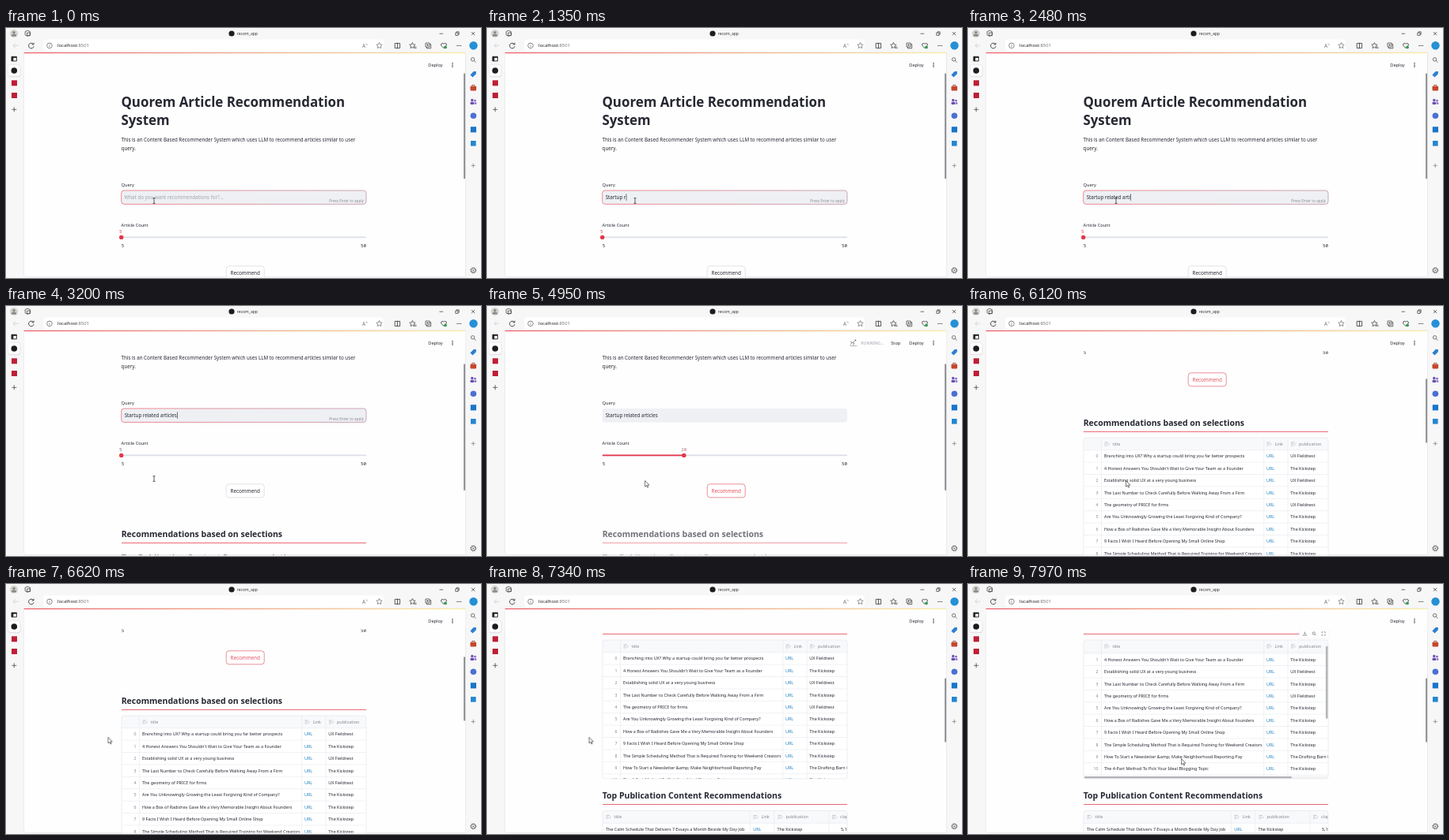
Animation, 600 px wide and 317 px high, one loop 8000 ms. Source, as an HTML page:

```html
<!DOCTYPE html>
<html lang="en">
<head>
<meta charset="utf-8">
<title>recom_app</title>
<style>
html, body { margin: 0; width: 100%; height: 100%; overflow: hidden; background: #f7f7f8; }
svg { display: block; width: 100vw; height: 100vh; font-family: "Noto Sans", "Open Sans", sans-serif; }
text { white-space: pre; }
.mono { font-family: "Noto Sans Mono", "DejaVu Sans Mono", monospace; }
</style>
</head>
<body>
<svg id="stage" viewBox="0 0 600 317">
  <defs>
    <linearGradient id="glow"><stop stop-color="#f0525e"/><stop offset="1" stop-color="#fbf0a0"/></linearGradient>
    <linearGradient id="focus"><stop stop-color="#ec5a66"/><stop offset="1" stop-color="#b98592"/></linearGradient>
    <clipPath id="panelClip"><path d="M22.5 31H580.5V315.5H25.5a3 3 0 0 1-3-3z"/></clipPath>
    <clipPath id="tableClip"><rect x="146" y="384" width="309" height="176" rx="3"/></clipPath>
    <clipPath id="rowsClip"><rect x="146" y="400" width="309" height="160"/></clipPath>
    <clipPath id="table2Clip"><rect x="146" y="600.5" width="309" height="176" rx="3"/></clipPath>
  </defs>
</svg>
<script>
const LOOP = 8000;
const INK = "#262832", RED = "#e5364a", GREY = "#85878f", LINE = "#e6e7ec", LINK = "#1f7fbe";
const stage = document.getElementById("stage");

function add(parent, tag, attrs = {}) {
  const el = document.createElementNS("http://www.w3.org/2000/svg", tag);
  for (const k in attrs) el.setAttribute(k, attrs[k]);
  parent.appendChild(el);
  return el;
}
const group = (p, attrs) => add(p, "g", attrs);
const rect = (p, x, y, width, height, fill, more = {}) => add(p, "rect", { x, y, width, height, fill, ...more });
const dot = (p, cx, cy, r, fill, more = {}) => add(p, "circle", { cx, cy, r, fill, ...more });
const stroke = (p, d, color = "#444", w = 0.8, more = {}) =>
  add(p, "path", { d, fill: "none", stroke: color, "stroke-width": w, ...more });

// cy is the vertical middle of the capitals
function label(p, x, cy, str, size, fill = INK, more = {}) {
  const el = add(p, "text", { x, y: cy + size * 0.37, "font-size": size, fill, ...more });
  el.textContent = str;
  return el;
}
const show = (el, on) => el.setAttribute("visibility", on ? "inherit" : "hidden");
const shift = (el, x, y) => el.setAttribute("transform", `translate(${x} ${y})`);

// ---- browser window ----
function drawWindow() {
  const g = group(stage);
  rect(g, 0, 0, 600, 317, "#f7f7f8");
  dot(g, 10, 7, 5, "#d5d3d0");
  dot(g, 10, 5.6, 1.7, "#8b8781");
  add(g, "path", { d: "M6.8 10.4a3.2 2.8 0 0 1 6.4 0z", fill: "#8b8781" });
  stroke(g, "M24.2 4.6l3-1.4 3.2 1.4v4.2l-3.2 1.6-3-1.6zM26.6 6h4v3.6h-4z", "#444", 0.8);
  dot(g, 285, 7, 3.6, "#1d1d1f");
  label(g, 291.8, 7, "recom_app", 5, "#333");
  stroke(g, "M547.5 7.2h4.6M567.8 6h3.2v3.4h-3.2zM569 6V4.8h3.2v3.4H571M588 5l4.2 4.2M592.2 5l-4.2 4.2", "#333", 0.7);

  rect(g, 47, 14.5, 430, 15, "#fff", { rx: 4 });
  stroke(g, "M15.5 22.3h-6.5M12 19.4l-3 2.9 3 2.9", "#cfcfd2");
  stroke(g, "M34.6 20.6a3.3 3.3 0 1 0 .5 2.6M35 18.7v2.2h-2.3", "#333", 0.9);
  dot(g, 55, 22.3, 3.3, "none", { stroke: "#555", "stroke-width": 0.7 });
  stroke(g, "M55 21.9v2M55 20.4v.7", "#555", 0.7);
  const url = label(g, 65, 22.3, "localhost", 5.9, "#222");
  add(url, "tspan", { fill: "#777" }).textContent = ":8501";
  label(g, 450, 22.5, "A", 6.3, "#777");
  stroke(g, "M455 19.4q1.3 1 1 2.6", "#777", 0.6);
  const star = "l1.1 2.4 2.6.3-1.9 1.8.5 2.6-2.3-1.3-2.3 1.3.5-2.6-1.9-1.8 2.6-.3z";
  stroke(g, "M471.5 18.5" + star, "#666", 0.7);
  stroke(g, "M491.2 19.4h6.4v6h-6.4zM494.4 18.8v7.2", "#333");
  stroke(g, "M513.4 18.5" + star + "M516 24h2.4M516.6 25.6h1.8", "#333", 0.7);
  stroke(g, "M530 19h5v5h-5zM531.5 24v1.8h5.2v-5.2h-1.7M532.5 20.3v2.4M531.3 21.5h2.4", "#333", 0.7);
  stroke(g, "M553 25.5l-3.3-3.2q-.6-3 1.7-3 1.1 0 1.6 1 .5-1 1.6-1 2.3 0 1.7 3z", "#333", 0.8);
  dot(g, 555, 24.4, 1.9, "#3a9b52");
  for (const x of [570, 572.2, 574.4]) dot(g, x, 22.4, 0.65, "#333");
  dot(g, 590.5, 22.3, 5.2, "#2590d6");

  // tab strip
  stroke(g, "M7 36.3h6.4v5.6h-6.4z", "#222", 0.9);
  rect(g, 7, 36.3, 6.4, 1.6, "#222");
  rect(g, 7, 36.3, 2.3, 5.6, "#222");
  rect(g, 2.7, 47.2, 15.6, 15, "#e2e2e5", { rx: 3 });
  rect(g, 2.5, 46.3, 15.5, 15, "#fff", { rx: 3, stroke: "#d8d8db", "stroke-width": 0.5 });
  dot(g, 10.3, 54, 3.8, "#1d1d1f");
  rect(g, 7, 66.3, 7, 7, "#bf1f36");
  rect(g, 7, 82, 7, 7, "#bf1f36");
  stroke(g, "M10.3 100.3v6M7.3 103.3h6", "#333", 0.7);

  // side bar
  dot(g, 589.6, 39.8, 2.2, "none", { stroke: "#555", "stroke-width": 0.8 });
  stroke(g, "M591.2 41.4l2.3 2.3", "#555");
  add(g, "path", { d: "M586.4 59.4l4.2-4.4h3.2v3.2l-4.3 4.3z", fill: "#2c7fd0" });
  rect(g, 586.5, 73.8, 7.6, 5.6, "#c4472c", { rx: 0.8 });
  stroke(g, "M588.7 73.8v-1.4h3.2v1.4", "#8f3522");
  dot(g, 588.8, 91.5, 1.7, "#6a4fb0");
  dot(g, 592.5, 92.2, 1.4, "#8c6bc8");
  rect(g, 586.5, 93.7, 4.8, 3.2, "#6a4fb0", { rx: 1.2 });
  rect(g, 591.6, 94.2, 2.8, 2.6, "#8c6bc8", { rx: 1 });
  dot(g, 590.4, 111.2, 3.8, "#4b6fd3");
  rect(g, 586.8, 125.2, 7.2, 7.2, "#1976c9");
  rect(g, 587, 143, 6.6, 6.6, "#2586cf");
  stroke(g, "M590.2 171.8v5.2M587.6 174.4h5.2", "#666", 0.6);
  dot(g, 590.3, 307.3, 2.8, "none", { stroke: "#555", "stroke-width": 0.9 });
  dot(g, 590.3, 307.3, 3.6, "none", { stroke: "#555", "stroke-width": 0.8, "stroke-dasharray": "1.4 1.43" });
  dot(g, 590.3, 307.3, 0.9, "#555");

  add(g, "path", { d: "M22.5 31H580.5V315.5H25.5a3 3 0 0 1-3-3z", fill: "#fefefe", stroke: "#e3e3e6", "stroke-width": 0.6 });
}

// ---- page content ----
const START = "The Kickstep", UX = "UX Fieldnest";
const rows = [
  ["Branching into UX? Why a startup could bring you far better prospects", UX],
  ["4 Honest Answers You Shouldn't Wait to Give Your Team as a Founder", START],
  ["Establishing solid UX at a very young business", UX],
  ["The Last Number to Check Carefully Before Walking Away From a Firm", START],
  ["The geometry of PRICE for firms", UX],
  ["Are You Unknowingly Growing the Least Forgiving Kind of Company?", START],
  ["How a Box of Radishes Gave Me a Very Memorable Insight About Founders", START],
  ["9 Facts I Wish I Heard Before Opening My Small Online Shop", START],
  ["The Simple Scheduling Method That is Required Training for Weekend Creators", START],
  ["How To Start a Newsletter &amp; Make Neighborhood Reporting Pay", "The Drafting Barn Collected"],
  ["The 4-Part Method To Pick Your Ideal Blogging Topic", START]
];
const ROW = 15.4, HEAD = 15.7;

function columnHead(p, x, cy, name) {
  stroke(p, `M${x} ${cy - 2}h4.4M${x} ${cy}h3M${x} ${cy + 2}h2M${x + 3.2} ${cy + 2.2}l3-3`, "#a0a2aa", 0.6);
  label(p, x + 10, cy, name, 5.4, GREY);
}
function tableFrame(p, top, height) {
  rect(p, 146, top, 309, height, "none", { rx: 3, stroke: LINE, "stroke-width": 0.7 });
}
function tableHead(p, top, edges, names) {
  rect(p, 146, top, 309, HEAD, "#f8f9fb");
  names.forEach(([x, name]) => columnHead(p, x, top + 8, name));
  stroke(p, `M146 ${top + HEAD}h309` + edges.map(x => `M${x} ${top}v176`).join(""), LINE, 0.6);
}
function heading(p, cy, str) {
  label(p, 145.7, cy, str, 10.5, INK, { "font-weight": 600 });
  rect(p, 146, cy + 10.9, 309, 0.9, "#e65563");
}

drawWindow();
const view = group(stage, { "clip-path": "url(#panelClip)" });
const page = group(view);

["Quorem Article Recommendation", "System"].forEach((s, i) =>
  label(page, 145.4, 93.8 + i * 23.4, s, 16.9, INK, { "font-weight": 700 }));
label(page, 145.6, 141.5, "This is an Content Based Recommender System which uses LLM to recommend articles similar to user", 6.2);
label(page, 145.6, 152.7, "query.", 6.2);

label(page, 145.6, 198.5, "Query", 5.6);
const box = rect(page, 145.7, 206, 309.3, 17.4, "#eef0f4", { rx: 3.5, "stroke-width": 0.7 });
const hint = label(page, 149.5, 214.6, "What do you want recommendations for?...", 6.2, "#a3a5ad");
const query = label(page, 149.7, 214.6, "", 6.2);
const caret = rect(page, 0, 210.3, 0.6, 8.6, "#222");
const enter = label(page, 452, 219, "Press Enter to apply", 4.7, "#8b8d95", { "text-anchor": "end" });

label(page, 145.6, 249.7, "Article Count", 5.6);
rect(page, 145.7, 264.4, 309.3, 1.9, "#dcdfe6", { rx: 0.9 });
const fill = rect(page, 145.7, 264.4, 0, 1.9, RED, { rx: 0.9 });
const thumb = dot(page, 0, 265.4, 2.7, RED);
const count = label(page, 0, 258.2, "5", 5.9, RED, { class: "mono", "text-anchor": "middle" });
label(page, 145.7, 275.6, "5", 5.9, INK, { class: "mono" });
label(page, 455, 275.6, "50", 5.9, INK, { class: "mono", "text-anchor": "end" });

const button = rect(page, 278.2, 301.8, 48, 17, "#fff", { rx: 3.5, "stroke-width": 0.7 });
const buttonText = label(page, 302.2, 310.2, "Recommend", 6.3, INK, { "text-anchor": "middle" });

const headings = group(page);
heading(headings, 365, "Recommendations based on selections");
const heading2 = group(headings);
heading(heading2, 581.1, "Top Publication Content Recommendations");

const results = group(page);
const table = group(results, { "clip-path": "url(#tableClip)" });
rect(table, 146, 384, 309, 176, "#fff");
const rowsBox = group(table, { "clip-path": "url(#rowsClip)" });
const rowList = group(rowsBox);
rows.forEach(([title, publication], i) => {
  const cy = 384 + HEAD + ROW * (i + 0.5);
  label(rowList, 164.5, cy, i, 5.2, GREY, { "text-anchor": "end" });
  label(rowList, 172, cy, title, 5.4);
  label(rowList, 377, cy, "URL", 5.4, LINK);
  label(rowList, 407.3, cy, publication, 5.4);
  stroke(rowList, `M146 ${cy + ROW / 2}h309`, LINE, 0.6);
});
tableHead(table, 384, [168.5, 373.7, 404], [[172.5, "title"], [377.5, "Link"], [408, "publication"]]);
const bars = group(table);
rect(bars, 146, 556.3, 309, 3.7, "#f4f4f6");
rect(bars, 147, 556.9, 262, 2.6, "#b4b5b9", { rx: 1.3 });
const vBar = rect(bars, 451.9, 384.3, 2.8, 92, "#b4b5b9", { rx: 1.3 });
tableFrame(results, 384, 176);

const tools = group(results);
rect(tools, 418.5, 370, 37.5, 12, "#fff", { rx: 2.5, stroke: "#eeeef1", "stroke-width": 0.5 });
stroke(tools, "M425.5 373.6v3M424.2 375.5l1.3 1.3 1.3-1.3M423.3 377v1.2h4.4V377", "#666", 0.6);
dot(tools, 436.8, 375.5, 1.6, "none", { stroke: "#666", "stroke-width": 0.7 });
stroke(tools, "M438 376.7l1.7 1.7", "#666", 0.7);
stroke(tools, "M447 375v-1.2h1.3M449.9 373.8h1.3V375M451.2 376.8v1.2h-1.3M448.3 378H447v-1.2", "#666", 0.7);

const table2 = group(results, { "clip-path": "url(#table2Clip)" });
label(table2, 150, 624, "The Calm Schedule That Delivers 7 Essays a Month Beside My Day Job", 5.4);
label(table2, 336.3, 624, "URL", 5.4, LINK);
label(table2, 366.5, 624, START, 5.4);
label(table2, 447, 624, "5,100", 5.4);
tableHead(table2, 600.5, [332.3, 362.7, 432], [[150.5, "title"], [336.5, "Link"], [367.5, "publication"], [436, "claps"]]);
tableFrame(results, 600.5, 176);

// ---- fixed page header ----
const scrollBar = rect(view, 578.1, 31, 2.2, 0, "#909195");
rect(view, 22.5, 31, 558, 26.6, "#fefefe");
rect(view, 22.5, 30.6, 558, 1.5, "url(#glow)");
label(view, 533.3, 46.9, "Deploy", 5.6);
for (const y of [44.7, 46.9, 49.1]) dot(view, 564, y, 0.75, INK);
const running = group(view);
dot(running, 465.3, 43.5, 1, "#777");
const runner = stroke(running, "", "#777", 0.8);
stroke(running, "M458.5 50.6h9", "#999", 0.7);
label(running, 472.3, 46.9, "RUNNING...", 5.3, "#a3a5ad");
label(running, 510.3, 46.9, "Stop", 5.6);

// ---- pointer ----
const arrow = add(stage, "path", {
  d: "M0 0v7.6l1.8-1.6 1.2 2.7 1.1-.5-1.2-2.6h2.4z", fill: "#fff", stroke: "#222", "stroke-width": 0.6
});
const beam = stroke(stage, "M-1.5 -3.3h3M0 -3.3v6.6M-1.5 3.3h3", "#333", 0.8);

// ---- motion ----
function at(t, keys, ease = u => u * u * (3 - 2 * u)) {
  if (t <= keys[0][0]) return keys[0][1];
  for (let i = 1; i < keys.length; i++) {
    const [t0, a] = keys[i - 1], [t1, b] = keys[i];
    if (t < t1) return a + (b - a) * ease((t - t0) / (t1 - t0));
  }
  return keys[keys.length - 1][1];
}
const linear = u => u;

const PHRASE = "Startup related articles";
const TYPED = [[140, 1], [900, 7], [990, 8], [1300, 9], [1710, 14], [1870, 15], [2030, 16], [2760, 24]];
const SCROLL = [[2840, 0], [3190, 76], [5310, 76], [5660, 132], [5700, 132], [6080, 217],
  [6625, 217], [6800, 265], [6980, 265], [7160, 313]];
const MOUSE_X = [[3380, 187], [3600, 146], [3660, 146], [4140, 248.9], [4190, 248.9], [4320, 300],
  [4500, 300], [4900, 199.6], [6120, 199.6], [6440, 129], [7340, 129], [7740, 269.6]];
const MOUSE_Y = [[3380, 219], [3600, 189], [4190, 189], [4320, 233], [4500, 233], [4900, 221.5],
  [6120, 221.5], [6440, 194.3], [7340, 194.3], [7740, 221.5]];

function render(t) {
  const scroll = at(t, SCROLL);
  const blurred = t >= 3620, busy = t >= 4500 && t < 5290, done = t >= 5290;
  shift(page, 0, -scroll);

  const n = t < 140 ? 0 : Math.floor(at(t, TYPED, linear) + 1e-6);
  query.textContent = PHRASE.slice(0, n);
  show(hint, n === 0);
  show(caret, n > 0 && !blurred);
  if (n) caret.setAttribute("x", 150 + query.getComputedTextLength());
  show(enter, !blurred);
  box.setAttribute("stroke", blurred ? "none" : "url(#focus)");

  const dragX = t < 3660 ? 145.7 : Math.min(at(t, MOUSE_X.slice(2, 4)), 248.9);
  const value = Math.round(5 + (dragX - 145.7) / 309.3 * 45);
  const x = 145.7 + (value - 5) / 45 * 309.3;
  thumb.setAttribute("cx", x);
  fill.setAttribute("width", x - 145.7);
  count.setAttribute("x", x - (value < 10 ? 1 : 0));
  count.textContent = value;
  count.setAttribute("fill", t > 2840 && t < 3620 ? "#77656c" : busy ? "#b9757e" : RED);

  const hot = t >= 4300;
  button.setAttribute("stroke", hot ? "#e4616d" : "#d5d7de");
  buttonText.setAttribute("fill", hot ? "#e4525f" : INK);

  headings.setAttribute("opacity", busy ? 0.65 : 1);
  shift(heading2, 0, done ? 0 : -186);
  show(results, done);
  show(running, busy);
  runner.setAttribute("d", Math.floor(t / 150) % 2
    ? "M464.3 45l-3 1.4-2.4-1.4M461.3 46.4l2.6 1.2-1.4 2.2M461.3 46.4l-2.6 2.8"
    : "M464.3 45l-3 1.6-2-2.6M461.3 46.6l3.4.6 1 2.4M461.3 46.6l-1.8 3.2");

  const inner = at(t, [[7880, 0], [7970, 14]]);
  shift(rowList, 0, -inner);
  vBar.setAttribute("y", 384.3 + inner * 0.53);
  const hover = done && t >= 7580;
  show(bars, hover);
  show(tools, hover);

  const ratio = done ? 0.283 : 0.56;
  scrollBar.setAttribute("y", 31 + scroll * ratio);
  scrollBar.setAttribute("height", 286 * ratio);

  const textCursor = t < 3440;
  show(beam, textCursor);
  show(arrow, !textCursor);
  shift(textCursor ? beam : arrow, at(t, MOUSE_X), at(t, MOUSE_Y));
}

function tick() {
  render(performance.now() % LOOP);
  requestAnimationFrame(tick);
}
tick();
</script>
</body>
</html>
```
